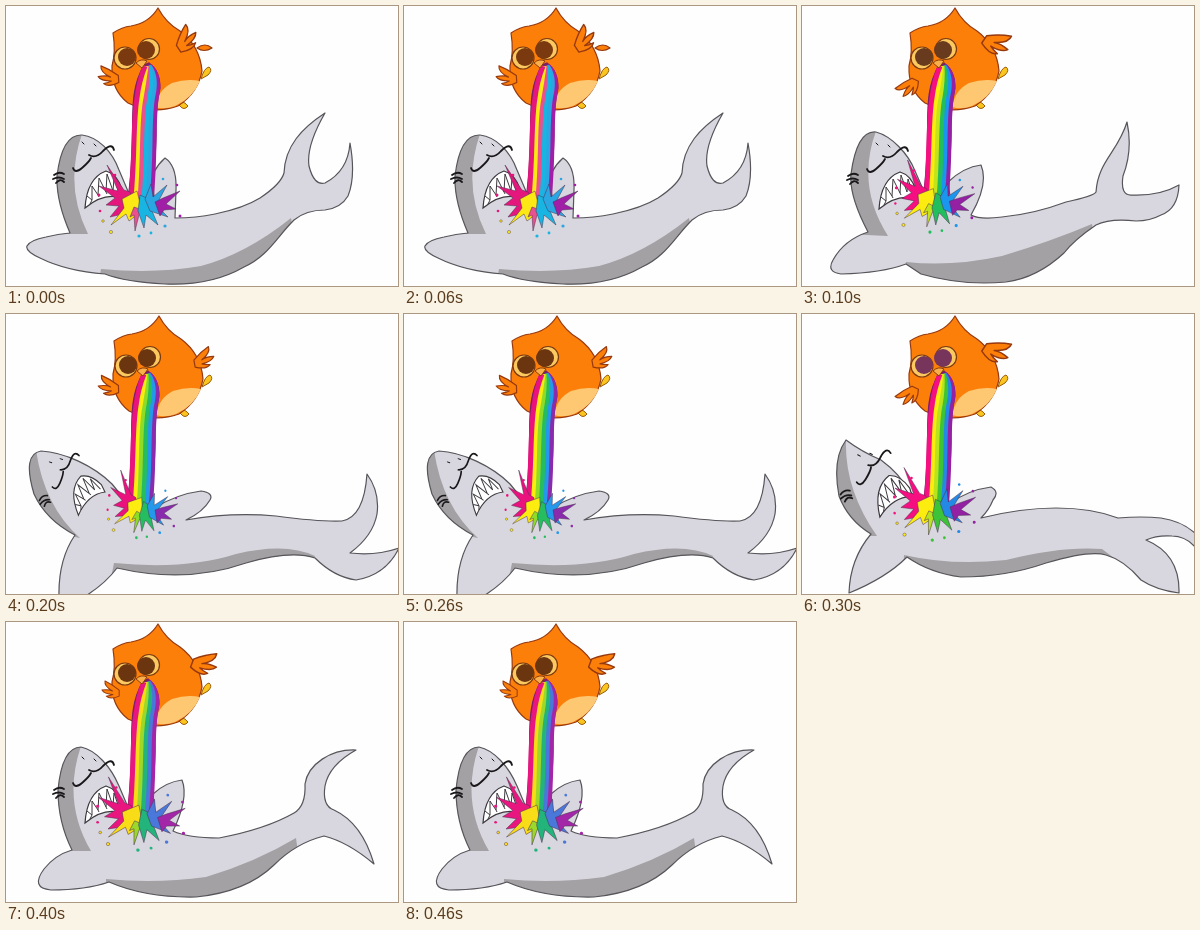
These frames come from a looping animation (392x280 px, 0.5 s). An HTML page without scripts:

```html
<!DOCTYPE html>
<html lang="en">
<head>
<meta charset="utf-8">
<title>Owl and shark</title>
<style>
  html, body { margin: 0; width: 100%; height: 100%; overflow: hidden; background: #fefefe; }
  svg { display: block; width: 100vw; height: 100vh; }

  /* Five poses, each held for one fifth of the loop */
  .pose { visibility: hidden; animation: hold .5s step-end infinite; animation-delay: calc(var(--i) * 100ms - 500ms); }
  @keyframes hold { 0% { visibility: visible; } 20%, 100% { visibility: hidden; } }

  .p0 { --i: 0; --a: #e3177c; --b: #fbe814; --c: #e8508e; --d: #18b4e2; --e: #2aa6e2; --f: #a01fa6; --eye: #7a390f; }
  .p1 { --i: 1; --a: #f50f80; --b: #fdec10; --c: #c3e41a; --d: #22bd5c; --e: #1b96ee; --f: #9420a4; --eye: #683a1e; }
  .p2 { --i: 2; --a: #ea127c; --b: #fdec10; --c: #8fdc28; --d: #25bd60; --e: #2498ea; --f: #8a2aac; --eye: #6b3510; }
  .p3 { --i: 3; --a: #f50f80; --b: #fdec10; --c: #b9e31c; --d: #3cc338; --e: #2389e4; --f: #9420a4; --eye: #77355c; }
  .p4 { --i: 4; --a: #ea1680; --b: #f9dc18; --c: #9cd82a; --d: #22b47a; --e: #4a78da; --f: #a426a8; --eye: #6b3510; }

  .body { fill: #d8d6de; }
  .shade { fill: #a3a1a4; }
  .line { fill: none; stroke: #57555a; stroke-width: 1.2; stroke-linejoin: round; }
  .ink { fill: none; stroke: #19171a; stroke-width: 1.8; stroke-linecap: round; }
  .owl { fill: #fc7f0a; stroke: #97390f; stroke-width: 1.2; stroke-linejoin: round; }
  .foot { fill: #fbc51f; stroke: #9b5c0c; stroke-width: 1; }
  .stripes path { fill: none; stroke-width: 5; }
  .a { fill: var(--a); } .b { fill: var(--b); } .c { fill: var(--c); }
  .d { fill: var(--d); } .e { fill: var(--e); } .f { fill: var(--f); }
</style>
</head>
<body>
<svg viewBox="0 0 392 280" preserveAspectRatio="none">
  <defs>
    <path id="body0" d="M76 129C92 131 106 145 113 164L124 190L146 190Q141 168 159 152Q171 160 170 184L169 212Q190 212 209 208Q238 202 254 192Q275 178 278 167C279 140 296 122 319 107Q300 140 303 160Q308 180 319 177Q342 165 344 137Q350 170 342 190Q335 202 319 204Q300 204 288 214C270 232 262 250 238 261Q205 280 159 278Q120 276 99 268Q60 265 34 252Q19 245 21 240Q24 234 40 231Q52 228 64 227Q50 195 51 170Q56 128 76 129Z"/>
    <path id="body1" d="M74 126C89 130 106 147 113 165L124 190L148 190L146 176Q162 161 179 159Q187 178 169 209Q178 214 200 211Q232 208 264 196Q292 190 294 186C296 155 316 146 325 116Q331 144 321 170Q318 190 330 189Q358 190 377 179Q376 203 359 209Q348 215 334 215Q308 212 294 219Q272 234 262 247Q235 272 204 276Q160 280 119 268L104 258Q80 267 39 268Q24 266 31 254Q42 234 66 226Q47 190 49 168Q55 124 74 126Z"/>
    <path id="body2" d="M35 137C58 138 88 152 106 170L124 192L150 193Q172 180 195 177Q208 179 204 186Q197 198 180 206Q225 198 270 202Q315 208 336 207Q358 203 361 160Q374 178 371 200Q367 222 344 239Q370 242 393 234Q380 261 350 266Q328 263 309 244Q285 236 240 249Q180 270 111 254Q99 270 78 283L53 283Q52 246 69 221Q40 206 28 180Q16 140 35 137Z"/>
    <path id="body3" d="M44 126Q60 138 79 146Q98 160 106 176L124 192L147 190Q166 176 189 173Q198 178 191 186Q187 196 179 204Q219 194 254 194Q290 194 316 204Q340 202 359 204Q380 207 394 220L394 234Q384 222 370 222Q355 221 344 226Q378 240 377 279Q354 276 339 266Q322 246 304 241Q288 236 244 249Q204 263 159 263Q128 259 105 243Q84 264 47 279Q48 245 69 220Q46 206 37 182Q30 145 44 126Z"/>
    <path id="body4" d="M75 125C90 128 105 145 113 164L124 190L149 190L147 172Q160 160 176 158Q183 176 167 209Q182 216 213 216Q260 207 288 191Q300 184 299 162C302 142 325 127 350 128Q323 143 319 164Q316 184 328 188Q356 201 368 242Q342 220 318 214Q290 221 268 243Q240 270 190 275Q140 276 103 260Q80 268 45 268Q24 266 38 247Q49 233 66 228Q52 200 52 168Q56 125 75 125Z"/>
    <clipPath id="clip0"><use href="#body0"/></clipPath>
    <clipPath id="clip1"><use href="#body1"/></clipPath>
    <clipPath id="clip2"><use href="#body2"/></clipPath>
    <clipPath id="clip3"><use href="#body3"/></clipPath>
    <clipPath id="clip4"><use href="#body4"/></clipPath>

    <!-- Face, centred on the mouth -->
    <g id="face">
      <path d="M-17 21Q-15-9 4-16Q15-13 20 2L20 11Q2 5-17 21Z" fill="#fff" stroke="#3c393e" stroke-width="1.2"/>
      <path d="M-15 9L-10 13L-10-1L-4 8L-3-9L4 5L5-13L11 4L12-9L17 6M-12 17L-10 13M-3 10L-4 8M5 7L4 5" fill="none" stroke="#3c393e"/>
      <path class="ink" d="M-29-19Q-27-13-20-19T-11-29M-13-32Q-6-28 1-36Q10-45 12-37"/>
      <path class="ink" d="M-48-12Q-43-16-38-13M-49-8Q-43-11-38-8M-46-4Q-42-9-38-5"/>
      <path class="ink" style="stroke-width:1" d="M-20-45l2 2M-8-43l2 2"/>
    </g>

    <!-- Stream from the beak -->
    <g id="stream">
      <path d="M137 59C122 85 127 110 125 145Q124 172 121 193H147C145 168 150 145 149 120Q149 98 153 82Q153 65 142 57Z" fill="#7d1f6a" stroke="#7d1f6a" stroke-width="1.2"/>
      <g class="stripes">
        <path stroke="var(--f)" d="M143 60Q153 69 150 88C145 110 149 150 144 192"/>
        <path stroke="var(--e)" d="M142 60Q150 71 146 89C141 112 145 150 140 192"/>
        <path stroke="var(--d)" d="M141 60Q146 73 142 90C137 113 141 150 136 192"/>
        <path stroke="var(--c)" d="M140 60Q141 74 138 91C133 114 136 150 132 192"/>
        <path stroke="var(--b)" d="M139 60Q137 75 134 92C129 115 132 150 128 192"/>
        <path stroke="var(--a)" d="M138 60Q132 75 130 92C126 115 128 150 124 192"/>
      </g>
    </g>

    <!-- Splash, centred on the impact -->
    <g id="splash">
      <g stroke="#493353" stroke-width=".5">
        <path class="a" d="M0 2L-6-11L-12-13L-29-38L-18-12L-37-17L-21-5L-30 2L-17 3L-26 14L0 8Z"/>
        <path class="b" d="M1-12L-14-4L-12 5L-25 22L-10 11L-7 18L6 8Z"/>
        <path class="c" d="M-2 4L-6 14L-2 12L-1 28L3 12L9 8Z"/>
        <path class="d" d="M4-8L2 8L8 25L10 12L22 22L16 8L20-1Z"/>
        <path class="e" d="M9-4L15-19L17-6L31-18L23-3L31 3L24 6L32 14L14 8Z"/>
        <path class="f" d="M19-1L27-5L44-12L30 1L40 6L28 7L24 13Z"/>
      </g>
      <g class="a"><circle cx="-37" cy="-8" r="1.5"/><circle cx="-21" cy="-28" r="1.3"/><circle cx="-36" cy="8" r="1.3"/></g>
      <g class="b" stroke="#493353" stroke-width=".4"><circle cx="-25" cy="29" r="1.6"/><circle cx="-33" cy="18" r="1.3"/></g>
      <g class="d"><circle cx="3" cy="33" r="1.6"/><circle cx="15" cy="30" r="1.4"/></g>
      <g class="e"><circle cx="29" cy="23" r="1.6"/><circle cx="27" cy="-24" r="1.3"/></g>
      <g class="f"><circle cx="44" cy="13" r="1.5"/><circle cx="41" cy="-18" r="1.3"/></g>
    </g>

    <!-- Three feathers, joined to the body at the origin -->
    <path id="wing" class="owl" d="M2 4Q-9 7-13 2Q-8 2-5 1Q-15-1-17-6Q-9-6-5-3Q-14-10-12-16Q-4-11 3-3Z"/>

    <g id="owl">
      <path class="foot" d="M195 73Q198 62 203 61Q207 64 202 69ZM170 96Q176 93 182 100Q178 105 174 100Z"/>
      <path class="owl" d="M107 27Q116 21 125 20Q143 17 152 2Q160 17 174 25Q194 40 196 65Q192 87 172 100Q146 109 122 97Q105 84 106 60Q110 46 107 27Z"/>
      <path d="M149 101Q152 84 166 77Q181 72 194 75Q187 92 169 100Q158 104 149 101Z" fill="#fec873"/>
      <g fill="#fbc95f" stroke="#7c3a10" stroke-width="1.2">
        <circle cx="119" cy="52" r="11"/><circle cx="143" cy="43" r="10.5"/>
      </g>
      <g fill="var(--eye)"><circle cx="121" cy="51" r="9"/><circle cx="140" cy="44" r="9"/></g>
    </g>
    <path id="beak" d="M130 57Q135 52 141 55L136 62Z" fill="#f9b04a" stroke="#8b3d0c"/>
  </defs>

  <g class="pose p0">
    <use href="#body0" class="body"/>
    <path class="shade" clip-path="url(#clip0)" d="M76 128L40 130L45 228H82Q58 180 76 128ZM95 263Q150 268 195 260Q240 248 285 212L300 290H90Z"/>
    <use href="#body0" class="line"/>
    <use href="#face" transform="translate(96 181)"/>
    <use href="#owl"/>
    <use href="#wing" transform="translate(110 73) rotate(-12)"/>
    <use href="#wing" transform="translate(175 41) scale(-1.15 1.15) rotate(25)"/>
    <path class="owl" d="M191 42Q199 36 206 42Q198 47 191 42Z"/>
    <use href="#stream" x="1"/><use href="#beak"/>
    <use href="#splash" transform="translate(130 197)"/>
  </g>

  <g class="pose p1">
    <use href="#body1" class="body"/>
    <path class="shade" clip-path="url(#clip1)" d="M74 125L40 130L44 228L86 230Q54 180 74 125ZM104 256Q150 261 200 250Q250 235 290 218L300 290H100Z"/>
    <use href="#body1" class="line"/>
    <use href="#face" transform="translate(94 182)"/>
    <use href="#owl" x="1"/>
    <use href="#wing" transform="translate(112 76) rotate(-72)"/>
    <use href="#wing" transform="translate(185 35) scale(-1.25 1.25) rotate(-42)"/>
    <use href="#stream"/><use href="#beak" x="1"/>
    <use href="#splash" transform="translate(129 194) rotate(7) scale(.97)"/>
  </g>

  <g class="pose p2">
    <use href="#body2" class="body"/>
    <path class="shade" clip-path="url(#clip2)" d="M30 136L10 140L30 215L74 224Q38 192 30 136ZM108 249Q180 256 230 240Q280 228 309 242L300 290H100Z"/>
    <use href="#body2" class="line"/>
    <use href="#face" transform="translate(78 177) rotate(-26) scale(.92)"/>
    <use href="#owl" x="1"/>
    <use href="#wing" transform="translate(110 75) rotate(-10)"/>
    <use href="#wing" transform="translate(191 49) scale(-1 1) rotate(2)"/>
    <use href="#stream"/><use href="#beak" x="1"/>
    <use href="#splash" transform="translate(133 194) rotate(10) scale(.85 .9)"/>
  </g>

  <g class="pose p3">
    <use href="#body3" class="body"/>
    <path class="shade" clip-path="url(#clip3)" d="M44 125L20 130L35 222H75Q42 175 44 125ZM102 241Q150 252 204 246Q260 232 300 235L312 244L300 290H100Z"/>
    <use href="#body3" class="line"/>
    <use href="#face" transform="translate(88 178) rotate(-17)"/>
    <use href="#owl" x="1"/>
    <use href="#wing" transform="translate(112 76) rotate(-72)"/>
    <use href="#wing" transform="translate(185 35) scale(-1.25 1.25) rotate(-42)"/>
    <use href="#stream"/><use href="#beak" x="1"/>
    <use href="#splash" transform="translate(129 193) rotate(3)"/>
  </g>

  <g class="pose p4">
    <use href="#body4" class="body"/>
    <path class="shade" clip-path="url(#clip4)" d="M75 124L40 130L45 229H85Q56 180 75 124ZM100 257Q150 262 200 255Q250 240 290 216L300 290H100Z"/>
    <use href="#body4" class="line"/>
    <use href="#face" transform="translate(96 180)"/>
    <use href="#owl"/>
    <use href="#wing" transform="translate(111 71) rotate(-8) scale(.85)"/>
    <use href="#wing" transform="translate(189 42) scale(-1.2 1.2) rotate(-28)"/>
    <use href="#stream"/><use href="#beak"/>
    <use href="#splash" transform="translate(131 195) rotate(4) scale(1.08 1)"/>
  </g>
</svg>
</body>
</html>
```
